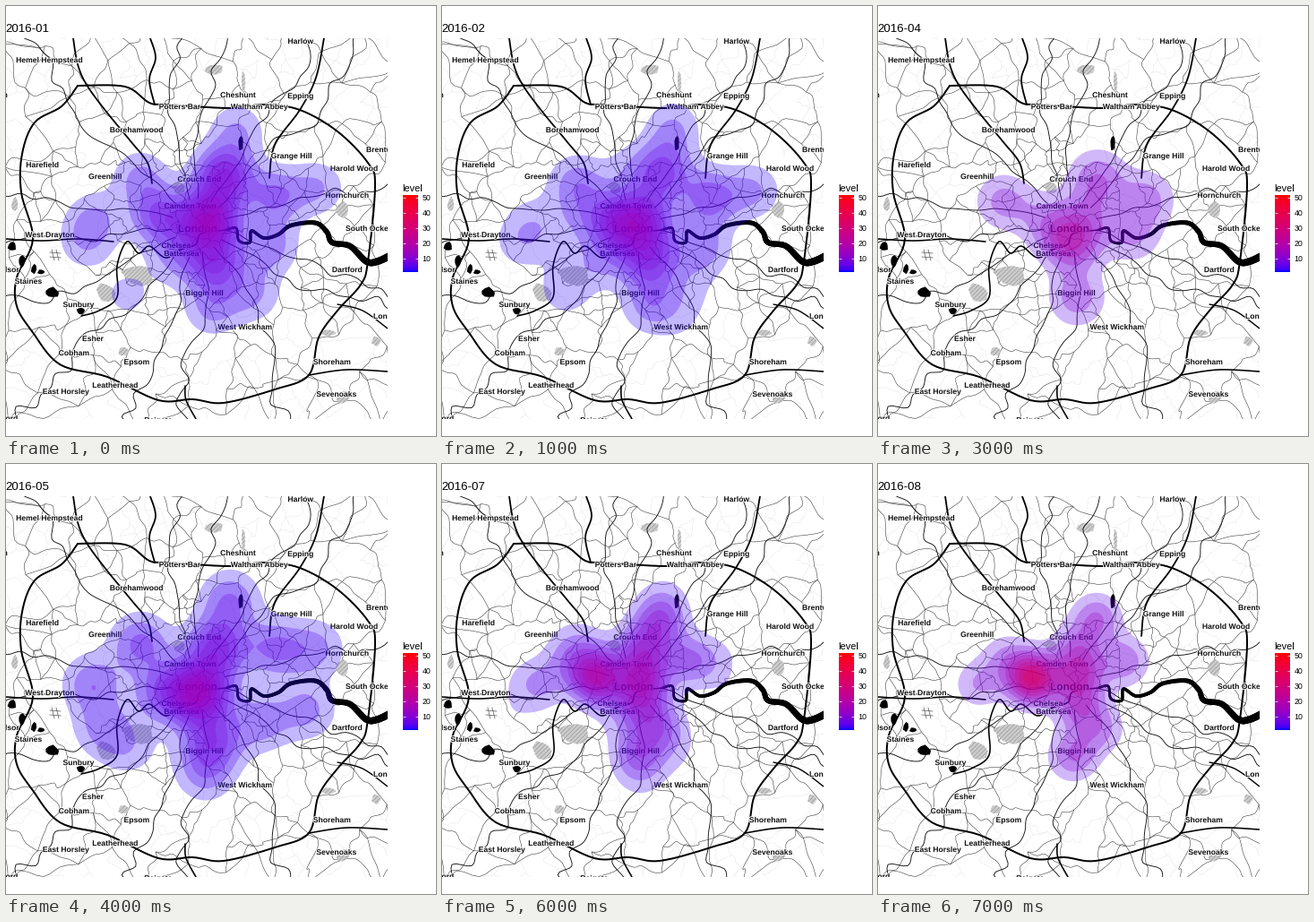
A matplotlib script for the animation above (8000 ms loop, 480 by 480 pixels).

```python
import numpy as np
import matplotlib.pyplot as plt
import matplotlib.patheffects as pe
from matplotlib.animation import FuncAnimation
from matplotlib.collections import LineCollection
from matplotlib.patches import Polygon

SIZE = 480
PX = 0.72  # points per pixel at 100 dpi
CENTER = np.array([215, 245])
rng = np.random.default_rng(16)

plt.rcParams["font.family"] = "Liberation Sans"
plt.rcParams["hatch.linewidth"] = 0.5
fig = plt.figure(figsize=(4.8, 4.8), dpi=100, facecolor="white")


def pixel_axes(x0, y0, x1, y1):
    ax = fig.add_axes([x0 / SIZE, 1 - y1 / SIZE, (x1 - x0) / SIZE, (y1 - y0) / SIZE])
    ax.set(xlim=(x0, x1), ylim=(y1, y0))
    ax.axis("off")
    return ax


page = pixel_axes(0, 0, SIZE, SIZE)
land = pixel_axes(0, 36, 426, 461)


# ---------- base map ----------

def spline(pts, n=8):
    """Catmull-Rom curve through the points."""
    p = np.asarray(pts, float)
    p = np.vstack([p[:1], p, p[-1:]])
    t = np.linspace(0, 1, n, endpoint=False)[:, None]
    parts = [b + 0.5 * t * (c - a + t * (2 * a - 5 * b + 4 * c - d + t * (3 * (b - c) + d - a)))
             for a, b, c, d in zip(p, p[1:], p[2:], p[3:])]
    return np.vstack(parts + [p[-1:]])


def road(width, *pts):
    land.plot(*spline(pts).T, color="black", lw=width * PX, zorder=3, solid_capstyle="round")


def network(spacing, tries, links, width, color):
    """Scattered junctions joined to their nearest neighbours."""
    nodes = np.empty((0, 2))
    for p in rng.uniform((-10, 26), (436, 471), (tries, 2)):
        gap = spacing(np.hypot(*(p - CENTER)))
        if not len(nodes) or np.hypot(*(nodes - p).T).min() > gap:
            nodes = np.vstack([nodes, p])
    pairs = {tuple(sorted((i, j))) for i, p in enumerate(nodes)
             for j in np.argsort(np.hypot(*(nodes - p).T))[1:links + 1]}
    lines = []
    for i, j in sorted(pairs):
        line = np.linspace(nodes[i], nodes[j], 5)
        line[1:-1] += rng.normal(0, 0.06 * np.hypot(*(nodes[i] - nodes[j])), (3, 2))
        lines.append(spline(line, 3))
    land.add_collection(LineCollection(lines, linewidths=width * PX, colors=color,
                                       zorder=1 + width), autolim=False)


def radials(count):
    """Main roads winding out from the centre."""
    r = np.linspace(30, 330, 22)
    for a in np.arange(count) * 2 * np.pi / count + 0.15:
        a = a + np.cumsum(rng.normal(0, 0.035, r.size))
        line = CENTER + np.column_stack([r * np.cos(a), r * np.sin(a)])
        land.plot(*spline(line, 4).T, color="#111111", lw=0.9 * PX, zorder=2.5)


def area(x, y, rx, ry, park=True):
    """Irregular patch: a hatched park or a black reservoir."""
    a = np.linspace(0, 2 * np.pi, 9, endpoint=False)
    k = rng.uniform(0.75, 1.15, a.size)
    style = dict(fc="#cccccc", ec="#999999", hatch="///////") if park else dict(fc="black")
    land.add_patch(Polygon(np.column_stack([x + rx * k * np.cos(a), y + ry * k * np.sin(a)]),
                           lw=0, zorder=2, **style))


network(lambda d: 15, 2500, 2, 0.5, "#e6e6e6")
network(lambda d: 10 + max(0, d - 60) * 0.13, 2600, 3, 0.55, "#3a3a3a")
radials(15)

for park in [(10, 221, 4, 8), (233, 71, 10, 6), (265, 86, 2, 13), (148, 300, 19, 12),
             (112, 320, 11, 11), (375, 228, 9, 9), (131, 386, 6, 5), (360, 365, 8, 4),
             (413, 374, 5, 6), (376, 437, 8, 8), (193, 203, 7, 6)]:
    area(*park)
for pool in [(7, 268, 5, 6), (18, 285, 4, 6), (31, 294, 3, 6), (39, 297, 4, 3), (51, 320, 8, 6),
             (84, 340, 5, 4), (262, 153, 3, 8)]:
    area(*pool, park=False)

# orbital motorway, then the routes that meet it
road(2, (80, 89), (62, 112), (32, 130), (18, 165), (17, 208), (30, 260), (12, 303), (12, 335),
     (29, 363), (60, 400), (113, 414), (170, 440), (208, 439), (243, 443), (300, 428), (338, 412),
     (349, 370), (370, 340), (396, 311), (404, 285), (412, 201), (404, 175), (370, 140),
     (328, 116), (288, 110), (250, 114), (180, 110), (160, 108), (133, 90), (80, 89))
road(1.8, (75, 36), (80, 65), (90, 88), (112, 118), (140, 152), (158, 175), (163, 198))
road(1.8, (161, 36), (167, 58), (160, 82), (166, 110))
road(1.8, (355, 36), (346, 80), (328, 116), (300, 155), (294, 192))
road(1.6, (0, 260), (40, 262), (80, 260), (120, 263))
road(1.6, (200, 424), (201, 440), (212, 461))
road(1.6, (338, 412), (380, 406), (426, 408))
road(1.4, (370, 333), (398, 340), (426, 360))

# river, widening towards the estuary
road(1.6, (84, 346), (104, 340), (124, 325), (124, 290), (135, 263), (148, 276), (160, 268),
     (178, 281), (195, 272), (212, 266), (218, 254), (246, 250))
river = spline([(246, 250), (257, 248), (260, 262), (272, 264), (274, 251), (288, 259), (304, 255),
                (318, 245), (345, 242), (358, 252), (364, 264), (384, 268), (402, 285), (415, 285),
                (434, 276)], 12)
for k, (p, q) in enumerate(zip(river, river[1:])):
    land.plot(*zip(p, q), color="black", lw=(2.6 + 6 * (k / len(river)) ** 1.6) * PX, zorder=3,
              solid_capstyle="round")

# airport outline
for k in (0, 5):
    land.plot([49, 61], [275 + k, 276 + k], color="#555555", lw=0.5, zorder=3)
    land.plot([51 + k, 54 + k], [272, 284], color="#555555", lw=0.5, zorder=3)

halo = [pe.withStroke(linewidth=1.3, foreground="white")]


def place(x, y, name, size=8.6, ha="center"):
    land.text(x, y + 0.36 * size, name, size=size * PX, weight="bold", ha=ha, color="#111111",
              path_effects=halo, clip_on=True, zorder=5)


for x, y, name in [
    (49, 60, "Hemel Hempstead"), (329, 39, "Harlow"), (259, 99, "Cheshunt"),
    (329, 100, "Epping"), (194, 112, "Potters Bar"), (283, 112, "Waltham Abbey"),
    (146, 138, "Borehamwood"), (319, 167, "Grange Hill"), (41, 177, "Harefield"),
    (389, 181, "Harold Wood"), (111, 190, "Greenhill"), (216, 193, "Crouch End"),
    (381, 211, "Hornchurch"), (206, 223, "Camden Town"), (49, 255, "West Drayton"),
    (190, 267, "Chelsea"), (196, 276, "Battersea"), (381, 294, "Dartford"),
    (25, 307, "Staines"), (81, 333, "Sunbury"), (222, 320, "Biggin Hill"),
    (267, 358, "West Wickham"), (97, 371, "Esher"), (76, 387, "Cobham"),
    (146, 397, "Epsom"), (364, 397, "Shoreham"), (122, 423, "Leatherhead"),
    (67, 430, "East Horsley"), (369, 433, "Sevenoaks"), (170, 462, "Reigate"),
]:
    place(x, y, name)
place(214, 248, "London", 12)
for x, y, name in [(402, 160, "Brentwood"), (379, 248, "South Ockendon"), (410, 346, "Longfield")]:
    place(x, y, name, ha="left")
for x, y, name in [(15, 294, "Windsor"), (14, 460, "Guildford"), (2, 99, "Chesham")]:
    place(x, y, name, ha="right")


# ---------- colour scale ----------

LOW, HIGH = 1.2, 51.8
BLUE, RED = np.array([32.3, 79.2, -107.9]), np.array([53.2, 80.1, 67.2])
XYZ_TO_RGB = np.array([[3.2406, -1.5372, -0.4986], [-0.9689, 1.8758, 0.0415],
                       [0.0557, -0.204, 1.057]])


def level_color(v):
    """Blue to red, blended in CIE Lab."""
    t = np.clip((v - LOW) / (HIGH - LOW), 0, 1)
    l, a, b = BLUE + (RED - BLUE) * t
    fy = (l + 16) / 116
    f = np.array([fy + a / 500, fy, fy - b / 200])
    xyz = np.where(f > 6 / 29, f ** 3, (f - 4 / 29) * 0.12842) * (0.9505, 1, 1.089)
    lin = np.clip(XYZ_TO_RGB @ xyz, 0, 1)
    return np.where(lin > 0.0031308, 1.055 * lin ** (1 / 2.4) - 0.055, 12.92 * lin)


bar = np.array([[level_color(v)] for v in np.linspace(HIGH, LOW, 86)])
page.imshow(bar, extent=(443, 460, 297, 211), aspect="auto", interpolation="nearest")
page.set(xlim=(0, SIZE), ylim=(SIZE, 0))
for v in range(10, 60, 10):
    y = 282 - (v - 10) * 1.7
    for x in (443, 456.6):
        page.plot([x, x + 3.4], [y, y], color="white", lw=0.5, solid_capstyle="butt")
    page.text(464.5, y + 3.2, str(v), size=8.8 * PX)
page.text(442.5, 207, "level", size=11 * PX)
title = page.text(-0.7, 29, "", size=13.2 * PX)


# ---------- kernel density ----------

X, Y = np.meshgrid(np.arange(0, 428, 2), np.arange(36, 462, 2))


def density(width, *kernels):
    """Sum of round Gaussians, each given as x, y and height."""
    return sum(h * np.exp(-((X - x) ** 2 + (Y - y) ** 2) / (2 * width ** 2))
               for x, y, h in kernels)


jan = density(22, (226, 240, 17), (243, 190, 12), (258, 139, 4), (300, 212, 6), (348, 203, 4),
              (295, 268, 5), (234, 287, 9), (230, 337, 4.5), (276, 322, 4), (172, 235, 8),
              (150, 192, 4.5), (98, 238, 4), (88, 266, 3), (135, 323, 2.6), (190, 280, 4))
mar = density(22, (203, 242, 19), (258, 132, 4), (250, 175, 6), (298, 215, 8), (347, 210, 4.5),
              (230, 277, 10), (288, 275, 5), (235, 330, 5.5), (268, 360, 2.4), (150, 203, 6),
              (128, 250, 3), (86, 264, 2.7), (140, 312, 4.5), (170, 285, 4), (205, 182, 4))
apr = density(22, (216, 262, 25), (245, 192, 14), (300, 215, 12), (140, 218, 12),
              (222, 326, 13), (285, 256, 10), (187, 240, 9), (238, 232, 8))
may = density(23, (216, 255, 17), (236, 205, 10), (250, 152, 6), (300, 206, 6), (346, 206, 4.5),
              (337, 275, 4.5), (285, 288, 5), (230, 310, 8), (222, 345, 4.5), (150, 200, 6.5),
              (96, 245, 5.5), (108, 295, 4.5), (138, 318, 3), (177, 255, 7))
jun = density(22, (219, 248, 17), (236, 195, 14), (248, 150, 6.5), (168, 220, 9), (148, 196, 5),
              (92, 244, 5), (72, 285, 4), (116, 315, 4), (230, 300, 9), (222, 350, 6),
              (300, 220, 8), (362, 198, 4.5), (330, 265, 4), (265, 325, 4), (190, 285, 4))
aug = density(19, (172, 239, 42), (224, 235, 22), (225, 270, 16), (222, 205, 12), (244, 172, 15),
              (275, 220, 14), (218, 326, 15), (248, 296, 11), (112, 246, 10), (142, 216, 9))

# surface and contour step for each month
months = [(jan, 2), ((jan + mar) / 2, 2), (mar, 2), (apr, 5),
          (may, 2), (jun, 2), (0.5 * jun + 0.5 * aug, 3), (aug, 5)]


def contours(z, step):
    """One translucent sheet per level, stacked towards the peak."""
    return [land.contourf(X, Y, z, levels=[v, 999], colors=[level_color(v)], alpha=0.28,
                          antialiased=True, zorder=10 + v / 100)
            for v in np.arange(step, z.max(), step)]


sheets = [contours(*month) for month in months]


def update(i):
    title.set_text(f"2016-{i + 1:02d}")
    for k, group in enumerate(sheets):
        for sheet in group:
            sheet.set_visible(k == i)
    return [title]


anim = FuncAnimation(fig, update, frames=len(months), interval=1000, repeat=True)
plt.show()
```
